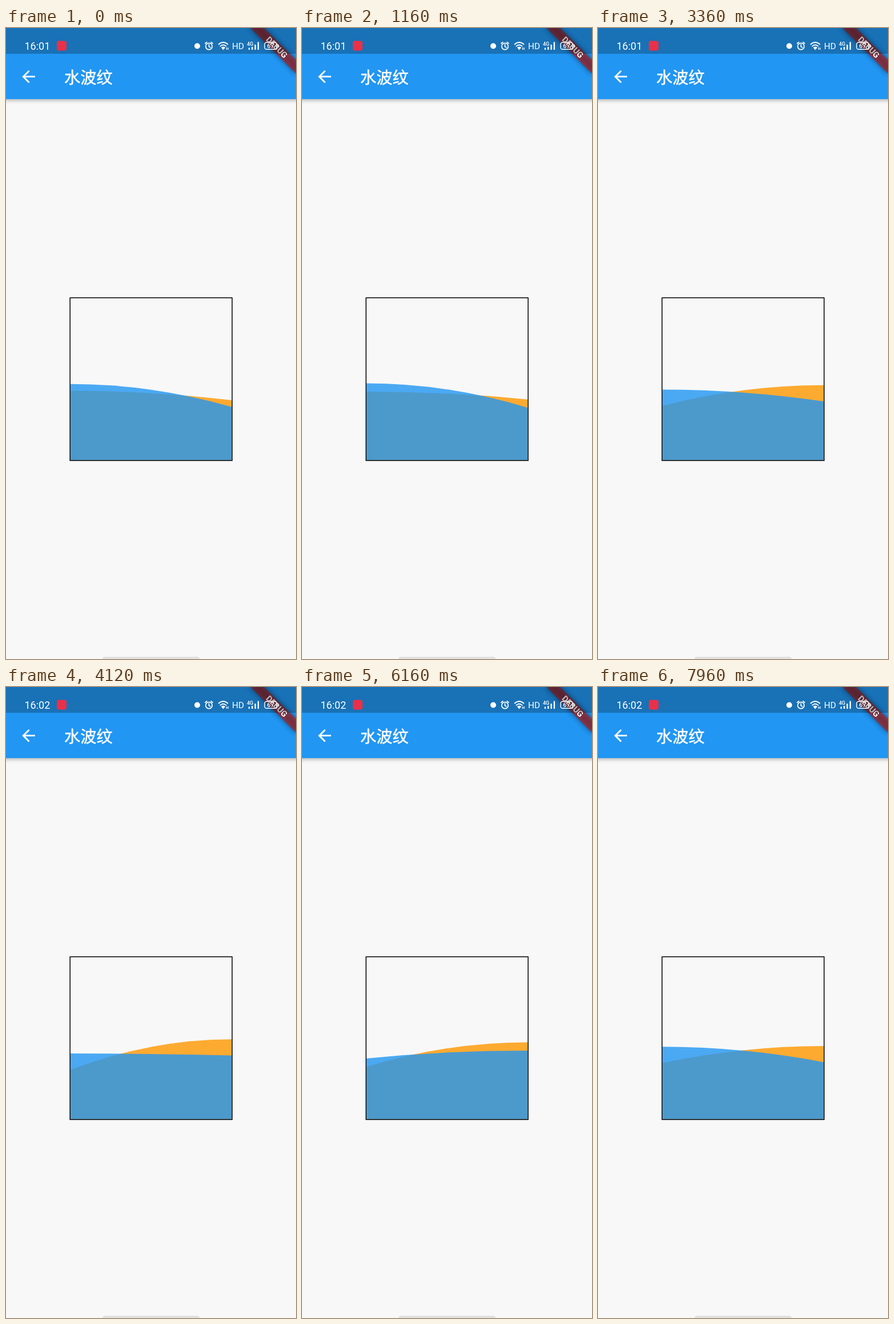
An HTML page for the animation above (8 s loop, 508x1102 px).

```html
<!DOCTYPE html>
<html lang="zh">
<head>
<meta charset="utf-8">
<title>水波纹</title>
<style>
  html, body { margin: 0; width: 100%; height: 100%; overflow: hidden; background: #f8f8f8; }
  svg { display: block; width: 100vw; height: 100vh; }
  text { fill: #fff; font-family: Roboto, sans-serif; }
  .title { font: 500 28.2px "Noto Sans CJK SC", "Noto Sans CJK", sans-serif; stroke: #fff; stroke-width: .5; }
  .line { fill: none; stroke: #fff; stroke-width: 1.7; stroke-linecap: round; }
</style>
</head>
<body>
<svg viewBox="0 0 508 1102" preserveAspectRatio="none">
  <defs>
    <filter id="barBlur" x="-5%" y="-30%" width="110%" height="160%"><feGaussianBlur stdDeviation="3.2"/></filter>
    <filter id="ribbonBlur" x="-30%" y="-150%" width="160%" height="400%"><feGaussianBlur stdDeviation="5"/></filter>
  </defs>
  <rect width="508" height="1102" fill="#f8f8f8"/>

  <!-- Waves -->
  <path id="orange" fill="#ff9800" fill-opacity=".8"/>
  <path id="blue" fill="#2196f3" fill-opacity=".8"/>
  <rect x="112.2" y="471.2" width="283.9" height="284.2" fill="none" stroke="#000" stroke-width="1.5"/>

  <!-- App bar -->
  <rect x="-20" y="20" width="548" height="107" opacity=".25" filter="url(#barBlur)"/>
  <rect width="508" height="124.2" fill="#2196f3"/>
  <path transform="translate(22.6 68) scale(1.411)" fill="#fff"
        d="M20 11H7.83l5.59-5.59L12 4l-8 8 8 8 1.41-1.41L7.83 13H20z"/>
  <text class="title" x="102" y="97">水波纹</text>

  <!-- Corner ribbon -->
  <g transform="translate(508 0) rotate(45)">
    <rect x="-56.4" y="39.5" width="112.8" height="16.9" opacity=".5" filter="url(#ribbonBlur)"/>
    <rect x="-56.4" y="39.5" width="112.8" height="16.9" fill="#b71c1c" fill-opacity=".63"/>
    <text y="52.6" font-size="14.4" font-weight="700" text-anchor="middle">DEBUG</text>
  </g>

  <!-- Status bar, shading everything beneath it -->
  <rect width="508" height="45" fill-opacity=".25"/>
  <text id="clock" x="32.5" y="37.5" font-size="18"></text>
  <rect x="89" y="22.5" width="17" height="17" rx="4" fill="#ea3048"/>
  <circle cx="335" cy="31.5" r="5" fill="#fff"/>
  <g class="line">
    <circle cx="355.5" cy="32" r="5.7"/>
    <path d="M355.5 28.8V32.4L357.8 33.8M349 27L351.8 24.7M362 27L359.2 24.7"/>
    <path d="M372.5 28.5Q380.5 21.5 388.5 28.5M375.2 31.8Q380.5 27.2 385.8 31.8"/>
    <rect x="453" y="25.3" width="21" height="12" rx="3.5" stroke-width="1.4"/>
    <path d="M476.3 29.5V33"/>
  </g>
  <path d="M376.8 34Q380.5 31 384.2 34L380.5 38.5Z" fill="#fff"/>
  <path d="M386.5 34V38M389 34V38" stroke="#fff" stroke-width="1.3"/>
  <text x="396" y="37" font-size="15.3">HD</text>
  <text x="422" y="31" font-size="9" font-weight="500">4G</text>
  <path d="M426 34.5V38M431.3 33V38M436.6 29V38M441.9 24.5V38" stroke="#fff" stroke-width="2.3"/>
  <text x="463.5" y="35.2" font-size="11" font-weight="500" text-anchor="middle">67</text>

  <path d="M169 1102Q169 1098 173 1098H335Q339 1098 339 1102Z" fill="#e2e2e2"/>
</svg>
<script>
  const LOOP = 8000, SWEEP = 5000, TURN = 520, CLOCK_TICK = 4100;
  const LEFT = 112.9, RIGHT = 395.4, BOTTOM = 754.7, LEVEL = 641.8, SWING = 28.2;
  const byId = id => document.getElementById(id);
  const [blue, orange, clock] = ['blue', 'orange', 'clock'].map(byId);

  // The surface tilts about LEVEL and is flat at its higher end.
  function drawWave(path, tilt) {
    const dy = tilt * SWING;
    path.setAttribute('d', `M${LEFT} ${LEVEL + dy}` +
      `Q${(LEFT + RIGHT) / 2} ${LEVEL - Math.abs(dy)} ${RIGHT} ${LEVEL - dy}` +
      `V${BOTTOM}H${LEFT}Z`);
  }

  function render(t) {
    const sweep = Math.abs(t - TURN) / SWEEP;
    const phase = 2 * (1 - Math.abs(1 - sweep)) - 0.5;
    drawWave(orange, 1 - Math.abs(1 - phase));
    drawWave(blue, Math.abs(phase) - 1);
    clock.textContent = t < CLOCK_TICK ? '16:01' : '16:02';
  }

  const start = performance.now();
  function frame() {
    render((performance.now() - start) % LOOP);
    requestAnimationFrame(frame);
  }
  frame();
</script>
</body>
</html>
```
